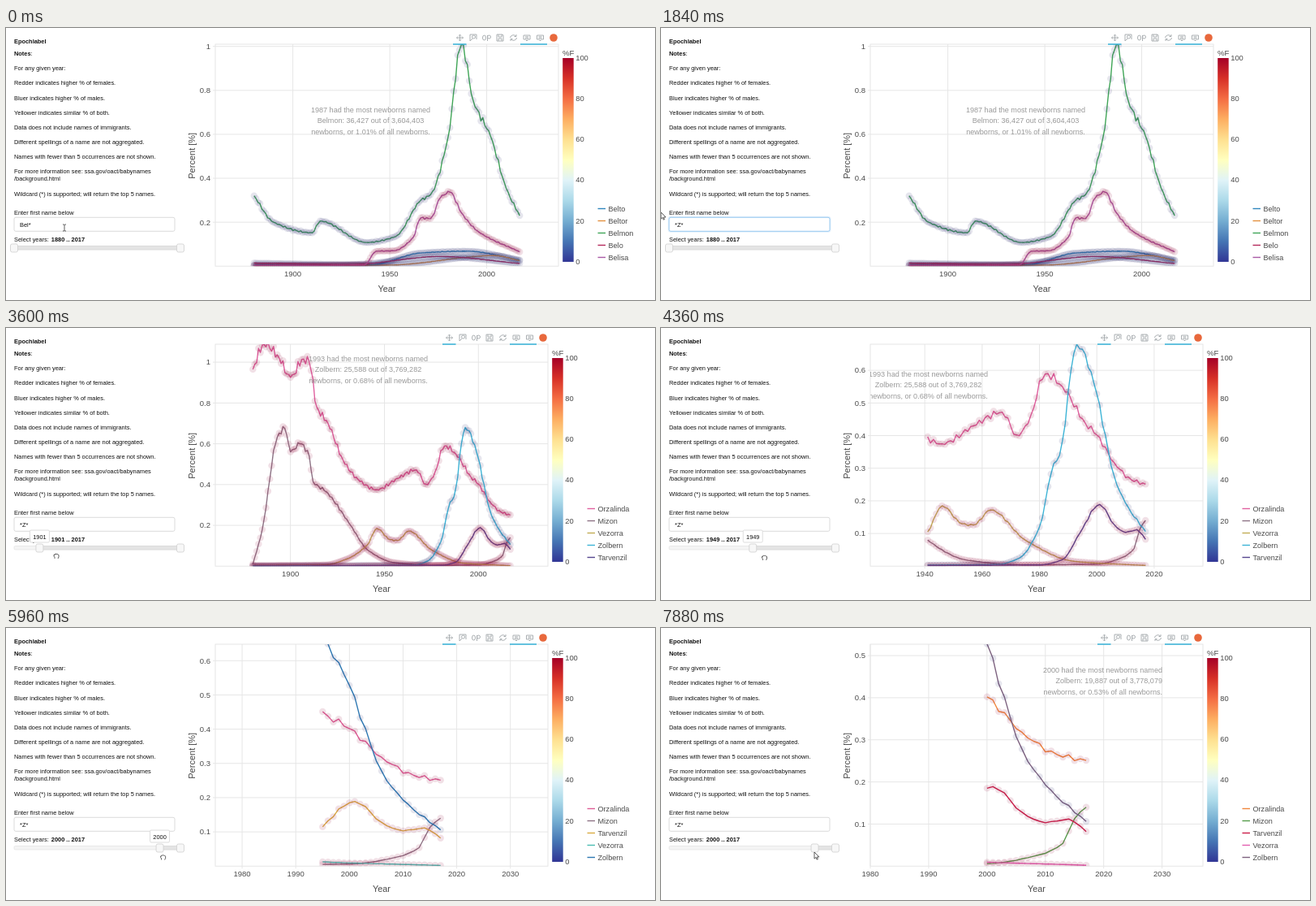
These frames come from a looping animation (800 by 335 pixels, 7920 ms). An HTML page:

```html
<!DOCTYPE html>
<html lang="en">
<head>
<meta charset="utf-8">
<title>Names by year</title>
<style>
html, body { margin: 0; width: 100%; height: 100%; overflow: hidden; background: #fff; }
svg { display: block; font-family: "Liberation Sans", Arial, sans-serif; }
#stage { width: 800px; height: 335px; }
.bold { font-weight: bold; }
.icon { fill: none; stroke: #aaafb2; stroke-width: 1; }
.grid { fill: none; stroke: #e6e6e6; }
</style>
</head>
<body>
<svg id="stage" viewBox="0 0 800 335"></svg>
<script>
const LOOP = 7920, STEP = 40, FIRST_YEAR = 1880, LAST_YEAR = 2017, MARGIN = 20;
const LEFT = 258, TOP = 20, HEIGHT = 273.3, BOTTOM = TOP + HEIGHT;
const GREY = '#4a4a4a';
const stage = document.getElementById('stage');

function el(tag, attrs, parent = stage, text) {
  const node = document.createElementNS('http://www.w3.org/2000/svg', tag);
  for (const key in attrs) node.setAttribute(key, attrs[key]);
  if (text !== undefined) node.textContent = text;
  parent.appendChild(node);
  return node;
}
// Places text by its vertical centre.
function label(x, cy, text, size, parent = stage, attrs = {}) {
  return el('text', { x, y: cy + size * 0.35, 'font-size': size, fill: '#111', ...attrs }, parent, text);
}
const show = (node, on) => node.setAttribute('visibility', on ? 'visible' : 'hidden');
const current = (list, t) => list.filter(item => item.from <= t).pop();

// Turning points of each curve: year, thousandths of a percent.
const curves = {
  Belto: [1880, 4, 1940, 6, 1966, 60, 1990, 68, 2017, 28],
  Beltor: [1880, 2, 1950, 5, 2004, 48, 2017, 25],
  Belmon: [1880, 320, 1890, 200, 1910, 152, 1914, 205, 1938, 108, 1953, 135, 1966, 300, 1971, 325, 1980, 585,
    1987, 1010, 1993, 755, 2002, 590, 2010, 355, 2017, 230],
  Belo: [1880, 14, 1930, 8, 1976, 44, 2017, 12],
  Belisa: [1880, 3, 1937, 6, 1943, 68, 1952, 70, 1962, 130, 1966, 220, 1971, 216, 1976, 310, 1981, 337, 1987, 242,
    1996, 155, 2017, 65],
  Orzalinda: [1880, 965, 1886, 1088, 1894, 1020, 1900, 925, 1907, 1015, 1910, 1000, 1914, 780, 1920, 700, 1928, 520,
    1936, 425, 1946, 375, 1957, 430, 1967, 472, 1972, 402, 1976, 437, 1982, 589, 1988, 550, 1996, 438, 2000, 402,
    2006, 318, 2012, 265, 2017, 251],
  Mizon: [1880, 10, 1885, 180, 1893, 632, 1897, 675, 1900, 560, 1905, 600, 1910, 540, 1912, 415, 1919, 365, 1932, 200,
    1941, 80, 1955, 18, 1975, 4, 2000, 6, 2009, 27, 2013, 54, 2015, 113, 2017, 140],
  Vezorra: [1880, 3, 1918, 6, 1930, 35, 1941, 105, 1946, 185, 1953, 130, 1957, 126, 1963, 172, 1975, 80, 1992, 15, 2017, 2],
  Zolbern: [1880, 1, 1965, 5, 1973, 25, 1980, 120, 1985, 315, 1987, 340, 1993, 680, 1998, 595, 2000, 528, 2006, 278,
    2010, 193, 2017, 106],
  Tarvenzil: [1880, 0, 1980, 4, 1988, 20, 1994, 100, 2001, 189, 2006, 128, 2010, 103, 2014, 112, 2017, 82]
};
const male = new Set(['Belto', 'Beltor', 'Belmon', 'Belo', 'Zolbern']);

// Monotone cubic through the turning points, with a slight ripple between them.
function valueAt(points, year) {
  const last = points.length / 2 - 2;
  const slope = i => (points[2 * i + 3] - points[2 * i + 1]) / (points[2 * i + 2] - points[2 * i]);
  const tangent = i => {
    if (i === 0 || i > last) return slope(Math.min(i, last));
    const a = slope(i - 1), b = slope(i);
    return a * b > 0 ? 2 * a * b / (a + b) : 0;
  };
  let i = 0;
  while (i < last && points[2 * i + 2] < year) i++;
  const [y0, v0, y1, v1] = points.slice(2 * i, 2 * i + 4);
  const w = y1 - y0, u = (year - y0) / w, r = 1 - u;
  const v = r * r * (1 + 2 * u) * v0 + u * u * (3 - 2 * u) * v1 + u * r * w * (r * tangent(i) - u * tangent(i + 1));
  return v * (1 + 0.1 * u * r * Math.sin(year * 2.4)) / 1000;
}

const note = (year, name, count, total, share) => [
  `${year} had the most newborns named`,
  `${name}: ${count} out of ${total}`,
  `newborns, or ${share}% of all newborns.`
];
const noteZ = note(1993, 'Zolbern', '25,588', '3,769,282', '0.68');
const firstSet = { Belto: '#2f86bd', Beltor: '#e3913f', Belmon: '#3fa556', Belo: '#b52a5c', Belisa: '#a95aa6' };
const secondSet = { Orzalinda: '#e0609f', Mizon: '#8d7385', Vezorra: '#c2ac55', Zolbern: '#3db4d6', Tarvenzil: '#56468f' };
const thirdSet = { Orzalinda: '#de5c96', Mizon: '#8d7385', Tarvenzil: '#d9ab42', Vezorra: '#4bbdb2', Zolbern: '#2d78b2' };
const lastSet = { Orzalinda: '#f0853c', Mizon: '#559c4b', Tarvenzil: '#cb1d48', Vezorra: '#e25fb0', Zolbern: '#7d627f' };

// axis: year the x range is built on; data: first year drawn.
const phases = [
  { from: 0, right: 681, axis: 1880, data: 1880, max: 1.01, lines: firstSet, note: note(1987, 'Belmon', '36,427', '3,604,403', '1.01'), at: [449.5, 101, 'middle'] },
  { from: 2880, right: 668, axis: 1880, data: 1880, max: 1.088, lines: secondSet, note: noteZ, at: [446.5, 38, 'middle'] },
  { from: 4320, right: 668, axis: 1941, data: 1941, max: 0.68, lines: secondSet, note: noteZ, at: [329.5, 57, 'middle'] },
  { from: 5320, right: 668, axis: 1980, data: 1980, max: 0.68, lines: secondSet },
  { from: 5920, right: 668, axis: 1995, data: 1995, max: 0.648, lines: thirdSet },
  { from: 6680, right: 668, axis: 2000, data: 1995, max: 0.527, lines: thirdSet },
  { from: 7440, right: 668, axis: 2000, data: 2000, max: 0.527, lines: lastSet, note: note(2000, 'Zolbern', '19,887', '3,778,079', '0.53'), at: [618, 52, 'end'] }
];

function drawToolbar(g, right) {
  const bubble = 'M-4-3H4V2H1L0 4L-1 2H-4ZM-2-1.2H2M-2 .5H2';
  const icons = [
    'M-4 0H4M0-4V4M-2.5-1.5L-4 0l1.5 1.5M2.5-1.5L4 0L2.5 1.5M-1.5-2.5L0-4l1.5 1.5M-1.5 2.5L0 4l1.5-1.5',
    'M-4 4V-4H4V2M-1.5-1a2 2 0 1 0 4 0a2 2 0 1 0-4 0M-1 1L-4 4',
    'M-5 0a2 3 0 1 0 4 0a2 3 0 1 0-4 0M1 4V-3M1-1a2 2 0 1 0 4 0a2 2 0 1 0-4 0',
    'M-4-4H3L4-3V4H-4ZM-2-4V-1H2V-4M-2 4V1H2V4',
    'M-4 0A4 3.8 0 0 1 3-2M4 0A4 3.8 0 0 1-3 2M3.5-4V-1.5H1M-3.5 4V1.5H-1',
    bubble, bubble
  ];
  icons.forEach((d, i) => el('path', { d, class: 'icon', transform: `translate(${right - 121.5 + i * 16.5} 12)` }, g));
  el('circle', { cx: right - 6, cy: 12, r: 4.8, fill: '#e8683c' }, g);
  el('path', { d: `M${right - 130} 20h16.5M${right - 47} 20h33`, stroke: '#36b2d8', 'stroke-width': 1.3 }, g);
}

function drawColorbar(g, right) {
  el('rect', { x: right + 5.2, y: 37, width: 13.5, height: 251, fill: 'url(#scale)' }, g);
  label(right + 5, 30.3, '%F', 9.6, g, { fill: GREY });
  for (let v = 0; v <= 100; v += 20) label(right + 21.2, 287.6 - v * 2.51, v, 9.4, g, { fill: GREY });
}

function drawLegend(g, right, lines) {
  Object.entries(lines).forEach(([name, color], i) => {
    const y = 222.5 + i * 15;
    el('path', { d: `M${right + 48.5} ${y}h9.5`, stroke: color, 'stroke-width': 1.4 }, g);
    label(right + 61.5, y, name, 9.1, g, { fill: GREY });
  });
}

function drawChart({ right, axis, data, max, lines, note, at }) {
  const g = el('g', {});
  const width = right - LEFT, first = axis - MARGIN, last = LAST_YEAR + MARGIN, span = last - first;
  const px = year => (year - first) / span * width;
  const py = value => HEIGHT * (1 - value / max);
  const plot = el('svg', { x: LEFT, y: TOP, width, height: HEIGHT, overflow: 'hidden' }, g);

  const xStep = span > 150 ? 50 : span > 70 ? 20 : 10;
  for (let year = Math.ceil(first / xStep) * xStep; year <= last; year += xStep) {
    const x = LEFT + px(year);
    el('path', { d: `M${x} ${TOP}V${BOTTOM + 3}`, class: 'grid' }, g);
    label(x, 303, year, 9.5, g, { fill: GREY, 'text-anchor': 'middle' });
  }
  const yStep = max > 0.9 ? 0.2 : 0.1;
  for (let i = 1; i * yStep <= max; i++) {
    const value = +(i * yStep).toFixed(1), y = TOP + py(value);
    el('path', { d: `M${LEFT - 3} ${y}H${right}`, class: 'grid' }, g);
    label(252, y, value, 9.5, g, { fill: GREY, 'text-anchor': 'end' });
  }
  el('rect', { x: LEFT, y: TOP, width, height: HEIGHT, class: 'grid' }, g);
  g.appendChild(plot);

  for (const name in lines) {
    const line = el('path', { fill: 'none', stroke: lines[name], 'stroke-width': 1.4, 'stroke-linejoin': 'round' }, plot);
    const dots = el('g', { fill: male.has(name) ? '#373c78' : '#96103f', 'fill-opacity': 0.13 }, plot);
    const path = [];
    for (let year = data; year <= LAST_YEAR; year++) {
      const cx = px(year).toFixed(1), cy = py(valueAt(curves[name], year)).toFixed(1);
      el('circle', { cx, cy, r: 4.2 }, dots);
      path.push(cx + ' ' + cy);
    }
    line.setAttribute('d', 'M' + path.join('L'));
  }

  if (note) note.forEach((text, i) =>
    label(at[0] - LEFT, at[1] - TOP + i * 13.2, text, 9.07, plot, { fill: '#999', 'text-anchor': at[2] }));
  label(LEFT + width / 2, 321, 'Year', 10.8, g, { fill: GREY, 'text-anchor': 'middle' });
  label(0, 0, 'Percent [%]', 11, g, { fill: GREY, 'text-anchor': 'middle', transform: 'translate(229.5 157.3) rotate(-90)' });
  drawToolbar(g, right);
  drawColorbar(g, right);
  drawLegend(g, right, lines);
  return g;
}

const scale = el('linearGradient', { id: 'scale', x1: 0, y1: 0, x2: 0, y2: 1 }, el('defs', {}));
['#a50026', '#d73027', '#f46d43', '#fdae61', '#fee090', '#ffffbf', '#e0f3f8', '#abd9e9', '#74add1', '#4575b4', '#313695']
  .forEach((color, i) => el('stop', { offset: i / 10, 'stop-color': color }, scale));

phases.forEach(phase => { phase.node = drawChart(phase); });

// Side panel
const SMALL = 7.42;
label(10, 16.3, 'Epochlabel', SMALL, stage, { class: 'bold' });
const notes = label(10, 31.2, '', SMALL);
el('tspan', { class: 'bold' }, notes, 'Notes');
el('tspan', {}, notes, ':');
let rowY = 49.8;
[
  'For any given year:',
  'Redder indicates higher % of females.',
  'Bluer indicates higher % of males.',
  'Yellower indicates similar % of both.',
  'Data does not include names of immigrants.',
  'Different spellings of a name are not aggregated.',
  'Names with fewer than 5 occurrences are not shown.',
  'For more information see: ssa.gov/oact/babynames\n/background.html',
  'Wildcard (*) is supported; will return the top 5 names.'
].forEach(paragraph => {
  const rows = paragraph.split('\n');
  rows.forEach((text, i) => label(10, rowY + i * 9.4, text, SMALL));
  rowY += 18.1 + (rows.length - 1) * 9.4;
});
label(10, 227.2, 'Enter first name below', SMALL);

const box = { x: 10, y: 233.3, width: 198, height: 17, rx: 2 };
const glow = el('rect', { ...box, fill: 'none', stroke: '#66afe9', 'stroke-opacity': 0.2, 'stroke-width': 3 });
const field = el('rect', { ...box, fill: '#fff', 'stroke-width': 0.8 });
const entry = label(17, 242, '', SMALL);

const years = label(10, 260.3, '', SMALL);
el('tspan', {}, years, 'Select years:');
const rangeText = el('tspan', { class: 'bold', dx: 3 }, years);

const SLIDER = 10, TRACK = 205;
const bar = { y: 268.5, height: 4.5, rx: 1.5, 'stroke-width': 0.6 };
el('rect', { ...bar, x: SLIDER, width: TRACK, fill: '#f4f4f4', stroke: '#ddd' });
const band = el('rect', { ...bar, fill: '#e4e4e4', stroke: '#d6d6d6' });
const handle = x => el('rect', { x: x - 4.5, y: 266, width: 9, height: 10, rx: 2, fill: '#f7f7f7', stroke: '#d0d0d0', 'stroke-width': 0.8 });
const grip = handle(SLIDER);
handle(SLIDER + TRACK);
const tip = el('g', {});
el('rect', { x: -12, y: 249, width: 24, height: 15, rx: 1.5, fill: '#fff', stroke: '#d4d4d4', 'stroke-width': 0.8 }, tip);
const tipText = label(0, 257, '', SMALL, tip, { 'text-anchor': 'middle' });

// Pointers
const arrow = 'M0 0V8.2L1.9 6.4 3.1 9.2 4.4 8.6 3.2 6H5.9Z';
const beam = 'M-2-4h1.5L0-3.5.5-4H2M0-3.5V3.5M-2 4h1.5L0 3.5.5 4H2';
const fist = 'M-2 3V1.5L-3 0V-1.5H-2V-2.3Q-1-3 0-2.5Q1.2-3 2-2Q3-2 3-1V1L2 3';
const pointers = [[0, beam, 'none'], [760, arrow, '#fff'], [3240, fist, '#fff'], [6600, arrow, '#fff']]
  .map(([from, d, fill]) => ({ from, node: el('path', { d, fill, stroke: '#333', 'stroke-width': 0.8 }) }));

// Keys: time, then the values reached at that time.
const pointerPath = [[0, 72, 246], [320, 72, 246], [1000, 0, 227], [1900, 0, 227], [2640, 7, 243], [2900, 7, 245],
  [3240, 12, 273], [3600, 62, 281], [5120, 193, 285], [6480, 194, 281], [6640, 189, 276], [LOOP, 189, 276]];
const startPath = [[0, 1880], [3260, 1880], [3600, 1901], [5120, 1997], [5560, 2000], [LOOP, 2000]];
const typing = [{ from: 0, text: 'Bel*' }, { from: 960, text: '*' }, { from: 1240, text: '*Z' }, { from: 1480, text: '*Z*' }];

function along(keys, t) {
  const i = keys.findIndex(key => key[0] > t);
  const a = keys[i - 1], b = keys[i], u = (t - a[0]) / (b[0] - a[0]);
  return a.slice(1).map((v, k) => v + (b[k + 1] - v) * u);
}

function draw(now) {
  const time = now % LOOP, t = time - time % STEP;
  const chart = current(phases, t), pointer = current(pointers, t);
  phases.forEach(phase => phase.node.setAttribute('display', phase === chart ? 'inline' : 'none'));
  pointers.forEach(item => show(item.node, item === pointer));
  pointer.node.setAttribute('transform', `translate(${along(pointerPath, t).join(' ')})`);

  const focused = t >= 320 && t < 2560;
  show(glow, focused);
  field.setAttribute('stroke', focused ? '#86bfee' : '#d2d2d2');
  entry.textContent = current(typing, t).text;

  const start = Math.round(along(startPath, t)[0]);
  const offset = (start - FIRST_YEAR) / (LAST_YEAR - FIRST_YEAR) * TRACK;
  rangeText.textContent = `${start} .. ${LAST_YEAR}`;
  grip.setAttribute('x', SLIDER + offset - 4.5);
  band.setAttribute('x', SLIDER + offset);
  band.setAttribute('width', TRACK - offset);
  show(tip, t >= 3240 && t < 6600);
  tip.setAttribute('transform', `translate(${SLIDER + offset} 0)`);
  tipText.textContent = start;
}

function tick() {
  draw(performance.now());
  requestAnimationFrame(tick);
}
tick();
</script>
</body>
</html>
```
